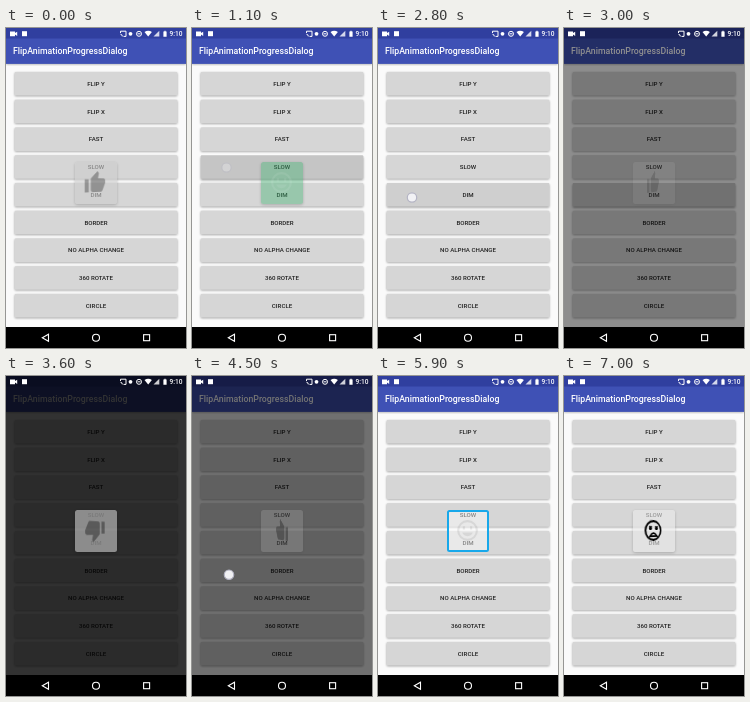
Recreate the animation shown at these times as an HTML page. Size 180x320 px, loop 7100 ms.

```html
<!DOCTYPE html>
<html lang="en">
<head>
<meta charset="utf-8">
<title>Flip dialog demo</title>
<style>
html, body { margin: 0; width: 100%; height: 100%; overflow: hidden; background: #fafafa; }
#stage, #dialog { position: absolute; }
#stage { left: 0; top: 0; font-family: Roboto, sans-serif; font-weight: 500; }
#dialog {
  left: 69px; top: 134px; width: 41.6px; height: 41.6px; box-sizing: border-box;
  border-radius: 2.5px; display: flex; align-items: center; justify-content: center;
}
#icon { width: 25px; height: 25px; flex: none; }
</style>
</head>
<body>
<svg id="stage" width="180" height="320" viewBox="0 0 180 320">
  <defs>
    <filter id="soft" x="-10%" y="-30%" width="120%" height="170%"><feGaussianBlur stdDeviation=".8"/></filter>
  </defs>
  <rect width="180" height="320" fill="#fafafa"/>
  <rect y="33" width="180" height="3.5" fill="#000" opacity=".3" filter="url(#soft)"/>
  <rect width="180" height="35.9" fill="#3f51b5"/>
  <rect width="180" height="10.5" fill="#303f9f"/>
  <text x="7" y="26.3" font-size="8.76" fill="#fff">FlipAnimationProgressDialog</text>
  <g id="buttons"></g>
  <rect id="dim" width="180" height="299" fill="#000"/>
  <g id="status" fill="#fff">
    <path d="M4 3.5h5v1.6l2.2-1.4v4.2L9 6.5v1.7H4z"/>
    <rect x="16" y="3.2" width="5" height="5"/>
    <path d="M114.5 5V3.2h5.5v5.2h-2.5M114.5 6.3q1.8 0 1.8 2.1" fill="none" stroke="#fff"/>
    <circle cx="124.5" cy="5.8" r="1.9"/>
    <circle cx="133" cy="5.8" r="2.5" fill="none" stroke="#fff"/>
    <path d="M131.5 5.8h3" stroke="#fff"/>
    <path d="M138.5 4q3.7-2.6 7.4 0l-3.7 4.6z"/>
    <path d="M153.3 2.8v5.8h-5.8z" opacity=".8"/>
    <path d="M157.4 3.5h1v-.7h1.2v.7h1v5.2h-3.2z"/>
    <text x="163.4" y="8.3" font-size="6.6">9:10</text>
  </g>
  <rect y="299" width="180" height="21" fill="#000"/>
  <g fill="none" stroke="#fff" stroke-width="1.1">
    <path d="M42.5 306.2v7l-6.2-3.5z"/>
    <circle cx="90" cy="309.7" r="3.5"/>
    <rect x="137.6" y="306.7" width="6" height="6"/>
  </g>
  <circle id="touch" r="4.7" fill="#f2f2f5" stroke="#b4b4c4" stroke-width="1.2"/>
</svg>
<div id="dialog"><svg id="icon" viewBox="0 0 24 24"></svg></div>
<script>
const LOOP = 7100;
const $ = id => document.getElementById(id);
const ramp = (t, a, b) => Math.min(1, Math.max(0, (t - a) / (b - a)));

const thumb = '<path fill="currentColor" d="M1 21h4V9H1zM23 10c0-1.1-.9-2-2-2h-6.3l1-4.9c0-.4-.2-.8-.5-1L14.2 1 7.6 7.6C7.2 8 7 8.4 7 9v10c0 1.1.9 2 2 2h9c.8 0 1.5-.5 1.8-1.2l3-7.1c.1-.2.2-.4.2-.7z"/>';
const face = parts => `<g fill="none" stroke="currentColor" stroke-width="2"><circle cx="12" cy="12" r="9"/>${parts}</g>`;
const icons = {
  up: thumb,
  down: `<g transform="rotate(180 12 12)">${thumb}</g>`,
  happy: face('<path d="M8.5 8v3M15.5 8v3"/><path d="M6.9 14h10.2a5.5 5.5 0 0 1-10.2 0z" fill="currentColor" stroke="none"/>'),
  dead: face('<path d="M7 8l3 3m0-3l-3 3M14 8l3 3m0-3l-3 3M8 17.3q4-5.4 8 0z" stroke-width="1.7"/>')
};

// show / hide: fade intervals; t0: start of the first flip
const dialogs = [
  { show: [-200, -100], hide: [840, 960], t0: -75, period: 300, icons: ['up', 'down'], bg: 'rgba(205,205,205,.6)' },
  { show: [1000, 1100], hide: [2530, 2680], t0: 1080, period: 700, icons: ['happy', 'up'], bg: 'rgba(65,177,112,.42)', ink: '#fff' },
  { show: [2880, 3100], hide: [4400, 4720], t0: 2738, period: 675, icons: ['up', 'down'], bg: 'rgba(255,255,255,.46)', dim: .8 },
  { show: [4980, 5120], hide: [6180, 6320], t0: 4750, period: 600, icons: ['happy'], bg: 'rgba(255,255,255,.45)', border: '#18a8ea' },
  { show: [6600, 6740], hide: [7200, 7300], t0: 6223, period: 600, icons: ['happy', 'dead'], bg: 'rgba(235,235,235,.6)', solid: true }
];

// Each entry: a tap that dismisses, then one that presses the button
const taps = [
  { button: 3, x: 34.5, y: 139.5, dismiss: 720, press: 960 },
  { button: 4, x: 34, y: 169.5, dismiss: 2470, press: 2760 },
  { button: 5, x: 37, y: 198.7, dismiss: 4420, press: 4800 },
  { button: 6, x: 37, y: 223, dismiss: 6130, press: 6450 }
];

const labels = ['FLIP Y', 'FLIP X', 'FAST', 'SLOW', 'DIM', 'BORDER', 'NO ALPHA CHANGE', '360 ROTATE', 'CIRCLE'];
$('buttons').innerHTML = labels.map((label, i) => {
  const box = 'x="8.7" width="162.6" height="23.4" rx="1"';
  return `<g transform="translate(0 ${44 + i * 27.75})">
    <rect class="shadow" ${box} y=".8" fill="#000" opacity=".35" filter="url(#soft)"/>
    <rect ${box} fill="#d6d6d6"/>
    <rect class="ripple" ${box} fill="#000" opacity="0"/>
    <text x="90" y="13.9" font-size="6.13" text-anchor="middle" fill="#212121">${label}</text>
  </g>`;
}).join('');
const ripples = document.querySelectorAll('.ripple');
const shadows = document.querySelectorAll('.shadow');

const pulse = (t, start) => ramp(t, start, start + 40) * (1 - ramp(t, start + 80, start + 170));

function drawTaps(t) {
  let shown = 0;
  for (const tap of taps) {
    const held = ramp(t, tap.press, tap.press + 110) * (1 - ramp(t, tap.press + 180, tap.press + 480));
    ripples[tap.button].setAttribute('opacity', .08 * held);
    shadows[tap.button].setAttribute('y', .8 + .9 * Math.sqrt(held));
    const strength = Math.max(pulse(t, tap.dismiss), pulse(t, tap.press));
    if (strength > shown) {
      shown = strength;
      $('touch').setAttribute('cx', tap.x);
      $('touch').setAttribute('cy', tap.y);
    }
  }
  $('touch').setAttribute('opacity', shown);
}

let currentIcon;
function drawDialog(t) {
  const d = dialogs.filter(d => d.show[0] <= t).pop();
  const visible = ramp(t, ...d.show) * (1 - ramp(t, ...d.hide));
  $('dim').setAttribute('opacity', (d.dim || 0) * visible);
  Object.assign($('dialog').style, {
    opacity: visible ** 3, // the window fades faster than the dim behind it
    background: d.bg,
    border: d.border ? `2px solid ${d.border}` : 'none',
    boxShadow: d.border ? 'none' : '0 1px 3px rgba(0,0,0,.2)'
  });

  const turns = (t - d.t0) / d.period;
  const count = Math.floor(turns);
  const eased = (1 - Math.cos((turns - count) * Math.PI)) / 2;
  const name = d.icons[count % d.icons.length];
  if (name !== currentIcon) $('icon').innerHTML = icons[currentIcon = name];
  Object.assign($('icon').style, {
    color: d.ink || '#000',
    transform: `perspective(100px) rotateY(${180 * eased}deg)`,
    opacity: d.solid ? 1 : Math.max(.08, 1 - Math.abs(2 * eased - 1))
  });
}

const begin = performance.now();
function frame() {
  const t = (performance.now() - begin) % LOOP;
  drawTaps(t);
  drawDialog(t);
  requestAnimationFrame(frame);
}
frame();
</script>
</body>
</html>
```
